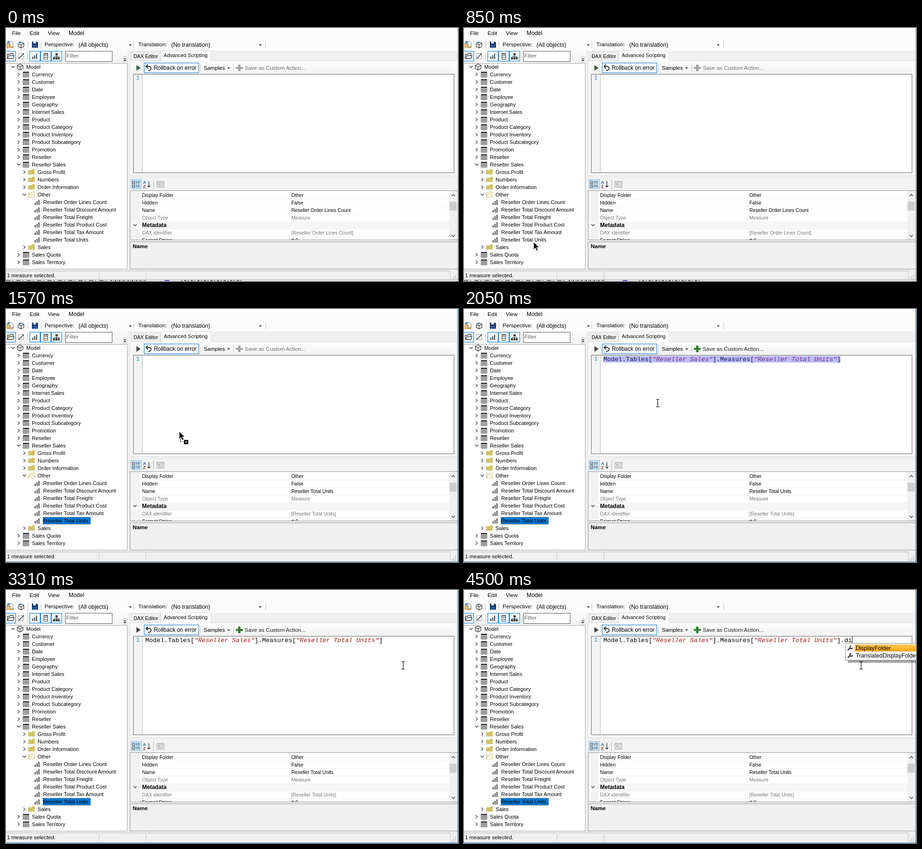
An HTML page that plays this animation: 960x539 px, repeating every 6080 ms.

```html
<!DOCTYPE html>
<html lang="en">
<head>
<meta charset="utf-8">
<title>Scripting editor</title>
<style>
html, body { margin: 0; width: 100%; height: 100%; overflow: hidden; background: #f0f0f0; }
svg { display: block; width: 100%; height: 100%; }
text { font-family: "Liberation Sans", Arial, sans-serif; white-space: pre; }
rect, .crisp { shape-rendering: crispEdges; }
.code { font-family: "Liberation Mono", "Courier New", monospace; font-size: 13.333px; }
.str { fill: #a31515; font-style: italic; }
.selected .code { fill: #12124e; }
.selected .str { fill: #7c2674; }
</style>
</head>
<body>
<svg id="stage" viewBox="0 0 960 539"></svg>
<script>
const LOOP = 6080;
const BLUE = '#0078d7', DARK = '#3b3b3b', GOLD = '#d0c267';

// Drawing helpers, each returning SVG markup
const rect = (x, y, w, h, fill, stroke) => stroke
  ? `<rect x="${x + .5}" y="${y + .5}" width="${w - 1}" height="${h - 1}" fill="${fill}" stroke="${stroke}"/>`
  : `<rect x="${x}" y="${y}" width="${w}" height="${h}" fill="${fill}"/>`;
const path = (d, fill, stroke = 'none', width = 1, extra = '') =>
  `<path d="${d}" fill="${fill}" stroke="${stroke}" stroke-width="${width}" ${extra}/>`;
const line = (d, stroke, width = 1, extra = '') => path(d, 'none', stroke, width, extra);
const text = (x, y, str, size = 11.15, fill = '#000', extra = '') =>
  `<text x="${x}" y="${y}" font-size="${size}" fill="${fill}" ${extra}>${str}</text>`;
const group = (id, content, extra = '') => `<g id="${id}" ${extra}>${content}</g>`;
const at = (x, y, content) => `<g transform="translate(${x} ${y})">${content}</g>`;
const vline = (x, y, h, fill = '#c4c4c4') => rect(x, y, 1, h, fill);
const hline = (x, y, w, fill = '#c4c4c4') => rect(x, y, w, 1, fill);
const drop = (x, y) => path(`M${x - 3} ${y - 1}h6l-3 3z`, '#222');

const chevrons = {
  right: (x, y) => line(`M${x - 2} ${y - 3.5}l3.5 3.5l-3.5 3.5`, '#555', 1.5),
  down: (x, y) => line(`M${x - 3.5} ${y - 2}l3.5 3.5l3.5 -3.5`, '#444', 1.5),
  up: (x, y) => line(`M${x - 3.5} ${y + 2}l3.5 -3.5l3.5 3.5`, '#444', 1.5),
};

// Icons are drawn around their centre
const icons = {
  cube: (x, y, color = DARK, s = 1) => line(
    `M${x} ${y - 6.5 * s}l${6 * s} ${3.2 * s}v${6.6 * s}l${-6 * s} ${3.2 * s}l${-6 * s} ${-3.2 * s}v${-6.6 * s}z` +
    `m${-6 * s} ${3.2 * s}l${6 * s} ${3.2 * s}l${6 * s} ${-3.2 * s}m${-6 * s} ${3.2 * s}v${6.6 * s}`, color, 1.2),
  table: (x, y) => rect(x - 6, y - 6, 13, 12, DARK) +
    [0, 1, 2].map(r => [0, 1, 2].map(c => rect(x - 5 + c * 4, y - 3 + r * 3, 3, 2, '#fff')).join('')).join(''),
  folder: (x, y) => path(`M${x - 7} ${y - 4}h7l2 -2h5v11h-14z`, GOLD),
  openFolder: (x, y) => path(`M${x - 6} ${y + 5}v-9h6l2 -2h4v3`, '#fff', GOLD, 1.2) +
    path(`M${x - 6} ${y + 5}l2 -6h10v6z`, '#fff', GOLD, 1.2),
  bars: (x, y) => rect(x - 5, y + 1, 2, 5, DARK) + rect(x - 1, y - 2, 2, 8, DARK) + rect(x + 3, y - 5, 2, 11, DARK),
  wrench: (x, y) => line(`M${x - 5} ${y + 4}l6 -5`, '#3c3c3c', 2.8) +
    line(`M${x + 2} ${y - 5}a3 3 0 1 0 3.5 4`, '#3c3c3c', 2.4),
};

function menuAndToolbars() {
  const button = x => rect(x, 49, 23, 22, '#f3f8fd', BLUE);
  return rect(0, 0, 960, 48, '#fcfcfc') + rect(0, 48, 258, 27, 'url(#strip)') +
    text(13, 15, 'File', 11.4) + text(50, 15, 'Edit', 11.8) + text(89, 15, 'View', 11.6) + text(133, 15, 'Model', 12.2) +
    // open, deploy, save
    path('M2 33h5l1 2h7v7h-13z', '#e4bd70', '#b98732') + path('M7 29h5l3 3v8h-6v-6h-2z', '#fff', '#777') +
    line('M3 33v-3h4m-2 -2l2 2l-2 2', '#1674bd', 1.4) +
    icons.cube(32, 36) + path('M25 28h6v5h-6z', '#fcfcfc') + line('M26 31h5m-2 -2l2 2l-2 2', '#1674bd', 1.4) +
    vline(46, 28, 15) + path('M55 29h11l2 2v11h-13z', '#10396f') +
    rect(58, 29, 6, 4, '#fff') + rect(62, 30, 1, 2, '#10396f') + rect(57, 36, 9, 5, '#315b94') + vline(74, 28, 15) +
    text(82, 39, 'Perspective:', 11.45) + text(154, 40, '(All objects)', 12.05) + drop(264, 36) + vline(271, 28, 15) +
    text(281, 39, 'Translation:', 11.7) + text(351, 40, '(No translation)', 12.1) + drop(540, 36) + vline(551, 28, 15) +
    // tree options
    rect(-1, 49, 22, 22, '#f3f8fd', BLUE) +
    path('M3 65v-9h5l2 -2h5v4', '#fff', DARK, 1.3) + path('M3 65l3 -6h11l-2 6z', '#fff', DARK, 1.3) +
    line('M26.500 54.500h11v11h-11z', '#555', 1, 'stroke-dasharray="2 2"') + line('M27 65l11 -11', '#333', 1.6) +
    vline(45, 53, 15) + button(50) + button(73) + button(96) + icons.bars(61, 60) +
    rect(80, 54, 9, 13, '#fff', DARK) + hline(80, 58, 9, DARK) + hline(80, 62, 9, DARK) + rect(80, 54, 9, 2, DARK) +
    rect(105, 54, 5, 4, DARK) + rect(107, 58, 1, 4, DARK) + hline(102, 60, 11, DARK) +
    [100, 105, 110].map(x => rect(x, 62, 4, 5, DARK)).join('') +
    vline(123, 53, 15) + rect(126, 49, 100, 23, '#fff', '#555') + text(128, 63, 'Filter', 11.8, '#666') +
    rect(248, 60, 9, 14, '#e2e2e2') + hline(250, 65, 5, '#222') + path('M250 68h5l-2.500 3z', '#222');
}

function tree() {
  const tables = ['Currency', 'Customer', 'Date', 'Employee', 'Geography', 'Internet Sales', 'Product', 'Product Category',
    'Product Inventory', 'Product Subcategory', 'Promotion', 'Reseller'];
  const measures = ['Order Lines Count', 'Total Discount Amount', 'Total Freight', 'Total Product Cost',
    'Total Tax Amount', 'Total Units'];
  const rows = [
    [0, 'cube', 'down', 'Model'],
    ...tables.map(name => [1, 'table', 'right', name]),
    [1, 'table', 'down', 'Reseller Sales'],
    ...['Gross Profit', 'Numbers', 'Order Information'].map(name => [2, 'folder', 'right', name]),
    [2, 'openFolder', 'down', 'Other'],
    ...measures.map(name => [3, 'bars', '', 'Reseller ' + name]),
    [2, 'folder', 'right', 'Sales'],
    [1, 'table', 'right', 'Sales Quota'],
    [1, 'table', 'right', 'Sales Territory'],
  ];
  return rect(-1, 75, 259, 439, '#fff', '#a5a8ad') +
    group('treePick', rect(78, 443, 102, 16, BLUE) +
      line('M78.500 443.500h101v15h-101z', '#d98a3a', 1, 'class="crisp" stroke-dasharray="1 1"')) +
    rows.map(([level, icon, chevron, name], i) => {
      const x = 15 + level * 12, y = 83 + i * 16;
      return (chevron ? chevrons[chevron](x, y) : '') + icons[icon](x + 15, y) + text(x + 28, y + 4, name);
    }).join('');
}

function editor() {
  return rect(258, 48, 702, 468, '#f0f0f0') +
    rect(263, 69, 697, 246, '#fafafa', '#dcdcdc') + rect(265, 50, 63, 20, '#f0f0f0', '#d9d9d9') +
    rect(328, 48, 108, 22, '#fff', '#d9d9d9') + rect(329, 69, 106, 1, '#fff') +
    text(271, 64, 'DAX Editor', 10.5) + text(335, 62, 'Advanced Scripting', 10.8) +
    rect(268, 73, 684, 25, 'url(#strip)') + rect(264, 98, 6, 216, '#f8f8f8') +
    path('M277 79l9 6l-9 6z', '#3f6247', 'none', 1, 'id="play"') +
    rect(293, 74, 117, 22, '#f7fafd', BLUE) +
    line('M299 82h5a4 4 0 0 1 0 8h-2', '#333', 2) + line('M301.500 78l-4 4l4 4', '#333', 2) +
    text(314, 89, 'Rollback on error', 11.9) + vline(413, 77, 16) +
    text(420, 89, 'Samples', 11.6) + drop(473, 85) + vline(483, 77, 16) +
    path('M493 78h5v5h5v4h-5v5h-5v-5h-5v-4h5z', 'currentColor', 'none', 1, 'id="plus"') +
    group('save', text(507, 89, 'Save as Custom Action...', 11.58, 'currentColor')) +
    rect(270, 98, 682, 211, '#fff', '#636363') + rect(271, 99, 18, 209, '#f4f4f4') + vline(289, 99, 209, '#b5b5b5') +
    text(276, 110, '1', 13.333, '#2b91af', 'class="code"') +
    group('codeLine', group('codePick', rect(296, 100, 504, 14, '#bcbcfc')) +
      `<text class="code" x="296" y="111">Model.Tables[<tspan class="str">"Reseller Sales"</tspan>].Measures[` +
      `<tspan class="str">"Reseller Total Units"</tspan>]<tspan id="typed"></tspan></text>`) +
    group('caret', rect(0, 99, 1, 15, '#000'));
}

function properties() {
  const rows = [['Display Folder', 'Other'], ['Hidden', 'False'], ['Name', ''], ['Object Type', 'Measure', '#777'],
    [], ['DAX identifier', '', '#777'], ['Format String', '#,0']];
  const lines = rows.map(([name, value, color], i) => {
    const y = 360 + i * 16;
    return hline(285, y + 4, 657, '#f0f0f0') +
      (name ? text(289, y, name, 10.4, color) + text(606, y, value, 10.4, color) : '');
  }).join('');
  return rect(264, 320, 695, 26, '#f3f3f3') + rect(265, 322, 23, 21, '#cce4f7', '#86bfe8') +
    [326, 334].map(y => rect(268, y, 6, 6, '#fff', '#333') + hline(270, y + 3, 2, '#333') +
      [0, 2, 4].map(d => hline(276, y + d, 3, '#2871ad') + hline(280, y + d, 4, '#555')).join('')).join('') +
    text(291, 332, 'A', 9, '#1c5aa0', 'font-weight="bold"') + text(291, 341, 'Z', 9, '#8c2c2c', 'font-weight="bold"') +
    line('M303.500 326v13m-3 -3l3 3l3 -3', '#222', 1.2) + vline(313, 323, 20, '#aaa') +
    rect(320, 326, 16, 14, '#e5e5e5', '#aaa') + hline(320, 328, 16, '#aaa') + rect(323, 331, 4, 3, '#aaa') +
    hline(329, 332, 5, '#aaa') + hline(323, 336, 11, '#aaa') +
    rect(263, 346, 697, 106, '#fff', '#8f9298') + rect(264, 347, 21, 104, '#f2f2f2') + vline(602, 347, 104, '#f0f0f0') +
    lines + rect(264, 412, 678, 16, '#f6f6f6') + chevrons.down(274, 420) +
    text(289, 424, 'Metadata', 12, '#000', 'font-weight="bold"') +
    text(606, 392, '', 10.4, '#000', 'id="propName"') + text(606, 440, '', 10.4, '#777', 'id="propDax"') +
    rect(942, 347, 17, 104, '#f0f0f0') + chevrons.up(950, 356) + chevrons.down(950, 443) + rect(942, 370, 15, 19, '#cdcdcd') +
    hline(263, 451, 697, '#8f9298') + rect(258, 452, 702, 4, '#f0f0f0') +
    rect(263, 455, 697, 59, '#f0f0f0', '#8f9298') + text(269, 469, 'Name', 11.8, '#000', 'font-weight="bold"');
}

function statusBar() {
  const grip = [0, 1, 2].map(r => Array.from({ length: r + 1 }, (_, c) =>
    rect(954 - c * 4, 526 + r * 4, 2, 2, '#b0b0b0')).join('')).join('');
  const cells = [[0, 198], [200, 98], [300, 644]].map(([x, w]) =>
    hline(x, 517, w, '#b5b5b5') + vline(x + w - 1, 517, 18, '#c2c2c2')).join('');
  const behind = rect(0, 535, 960, 4, '#e4e4e4') + hline(0, 535, 960, '#bcbcbc') +
    line('M0 538h215', '#7b7186', 2, 'stroke-dasharray="9 4 2 7"') +
    line('M222 538h78', '#555', 2, 'stroke-dasharray="3 3 1 2"') + rect(337, 537, 10, 2, '#5257c8') +
    line('M372 538h130', '#666', 2, 'stroke-dasharray="2 4 5 3"');
  return rect(0, 514, 960, 25, '#f0f0f0') + cells + text(2, 531, '1 measure selected.', 11.45) + grip +
    group('inactive', behind + vline(959, 0, 539, '#b4b4b4')) +
    group('active', hline(0, 538, 960, '#2a8bd8') + vline(959, 0, 539, '#2a8bd8'));
}

function popup(id, names, width, bottom, scroll) {
  const h = bottom - 113;
  const rows = names.map((name, i) => {
    const y = 124 + i * 16;
    return (name === 'Delete' ? icons.cube(819, y, '#68409b', .72) : icons.wrench(820, y)) +
      text(832, y + 4, name, 12.2);
  }).join('');
  return group(id, rect(815, 118, 145, h, '#000" opacity=".35') + rect(810, 113, 154, h, '#fff', '#8a8a8a') +
    rect(830, 116, width, 15, 'url(#pick)', '#efac3c') + rows +
    (scroll ? rect(946, 114, 14, h - 2, '#f0f0f0') + chevrons.up(953, 124) + chevrons.down(953, 287) +
      rect(946, 132, 14, 68, '#cdcdcd') + line('M816 294.500h9', '#555', 1.5) : ''));
}

function cursors() {
  const arrow = path('M0 0v16l3.700 -3.500l2.700 6l2.500 -1.100l-2.600 -5.900h4.900z', '#000', '#fff', .6);
  const drag = line('M2 15.500h8m-8 0v6h7', '#000', 1, 'class="crisp" stroke-dasharray="2 1"') +
    rect(10, 18, 9, 9, '#000') + rect(12, 22, 5, 1, '#fff') + rect(14, 20, 1, 5, '#fff');
  const beam = line('M-3 -7.500h2.500l1 1l1 -1h2.500m-3.500 1v14m-3.500 1h2.500l1 -1l1 1h2.500', '#000', 1.1);
  return group('cursor', group('arrow', arrow) + group('drag', drag) + group('beam', beam));
}

const gradient = (id, from, to) => `<linearGradient id="${id}" x2="0" y2="1"><stop stop-color="${from}"/>` +
  `<stop offset="1" stop-color="${to}"/></linearGradient>`;
const members = ['DataType', 'DaxObjectFullName', 'DaxObjectName', 'DaxTableName', 'Delete', 'Description',
  'DisplayFolder', 'ErrorMessage', 'Expression', 'FormatString', 'InPerspective'];

const stage = document.getElementById('stage');
stage.innerHTML = `<defs>${gradient('strip', '#fcfcfc', '#f2f2f2')}${gradient('pick', '#ffcb62', '#ffa50a')}</defs>` +
  menuAndToolbars() + tree() + editor() + properties() + statusBar() +
  popup('fullList', members, 115, 297, true) +
  popup('shortList', ['DisplayFolder', 'TranslatedDisplayFolder'], 134, 150, false) + cursors();

const $ = id => document.getElementById(id);
const show = (id, on) => $(id).setAttribute('visibility', on ? 'inherit' : 'hidden');

// Pointer moves: kind, start, end, steps, then start, control and end points
const moves = [
  ['arrow', 160, 610, 7, [481, 496], [290, 498], [159, 464]],
  ['arrow', 780, 850, 2, [153, 460], [150, 458], [148, 456]],
  ['drag', 1160, 1570, 6, [152, 452], [240, 350], [368, 261]],
  ['drag', 1650, 1820, 3, [388, 238], [402, 212], [411, 201]],
  ['beam', 2050, 2580, 8, [411, 200], [620, 255], [829, 168]],
  ['beam', 2660, 2830, 3, [837, 164], [841, 161], [843, 160]],
  ['arrow', 3960, 3961, 1, [842, 160], [842, 160], [842, 160]],
  ['beam', 4500, 4501, 1, [843, 160], [843, 160], [843, 160]],
];
// Typed text and caret: time, text, caret position (0 hides it)
const typing = [[0, '', 0], [2830, '', 800], [3310, '', 0], [3710, '.', 808], [4260, '.', 0],
  [4420, '.d', 816], [4500, '.di', 824]];

function pointer(t) {
  const move = moves.findLast(m => t >= m[1]);
  if (!move) return null;
  const [kind, start, end, steps, a, c, b] = move;
  const last = Math.max(steps - 1, 1);
  const s = Math.min(last, Math.floor((t - start) / (end - start) * last + .07)) / last;
  const [x, y] = [0, 1].map(i => a[i] * (1 - s) ** 2 + 2 * c[i] * s * (1 - s) + b[i] * s * s);
  return { kind, x: Math.round(x), y: Math.round(y) };
}

function draw(t) {
  const p = pointer(t), picked = t >= 1000, dropped = t >= 2050, marked = dropped && t < 2830;
  show('cursor', p);
  if (p) {
    $('cursor').setAttribute('transform', `translate(${p.x} ${p.y})`);
    show('arrow', p.kind !== 'beam');
    show('drag', p.kind === 'drag');
    show('beam', p.kind === 'beam');
  }
  show('treePick', picked);
  show('active', picked);
  show('inactive', !picked);
  $('play').setAttribute('fill', picked ? '#444' : '#3f6247');
  const name = 'Reseller ' + (picked ? 'Total Units' : 'Order Lines Count');
  $('propName').textContent = name;
  $('propDax').textContent = `[${name}]`;

  show('codeLine', dropped);
  show('codePick', marked);
  $('codeLine').setAttribute('class', marked ? 'selected' : '');
  $('plus').style.color = dropped ? '#2f7d32' : '#a3a3a3';
  $('save').style.color = dropped ? '#1e1e1e' : '#6d6d6d';

  const [, typed, caretX] = typing.findLast(step => t >= step[0]);
  $('typed').textContent = typed;
  show('caret', caretX);
  $('caret').setAttribute('transform', `translate(${caretX} 0)`);
  show('fullList', t >= 3880 && t < 4500);
  show('shortList', t >= 4500);
}

const began = performance.now();
function tick() {
  draw((performance.now() - began) % LOOP);
  requestAnimationFrame(tick);
}
tick();
</script>
</body>
</html>
```
